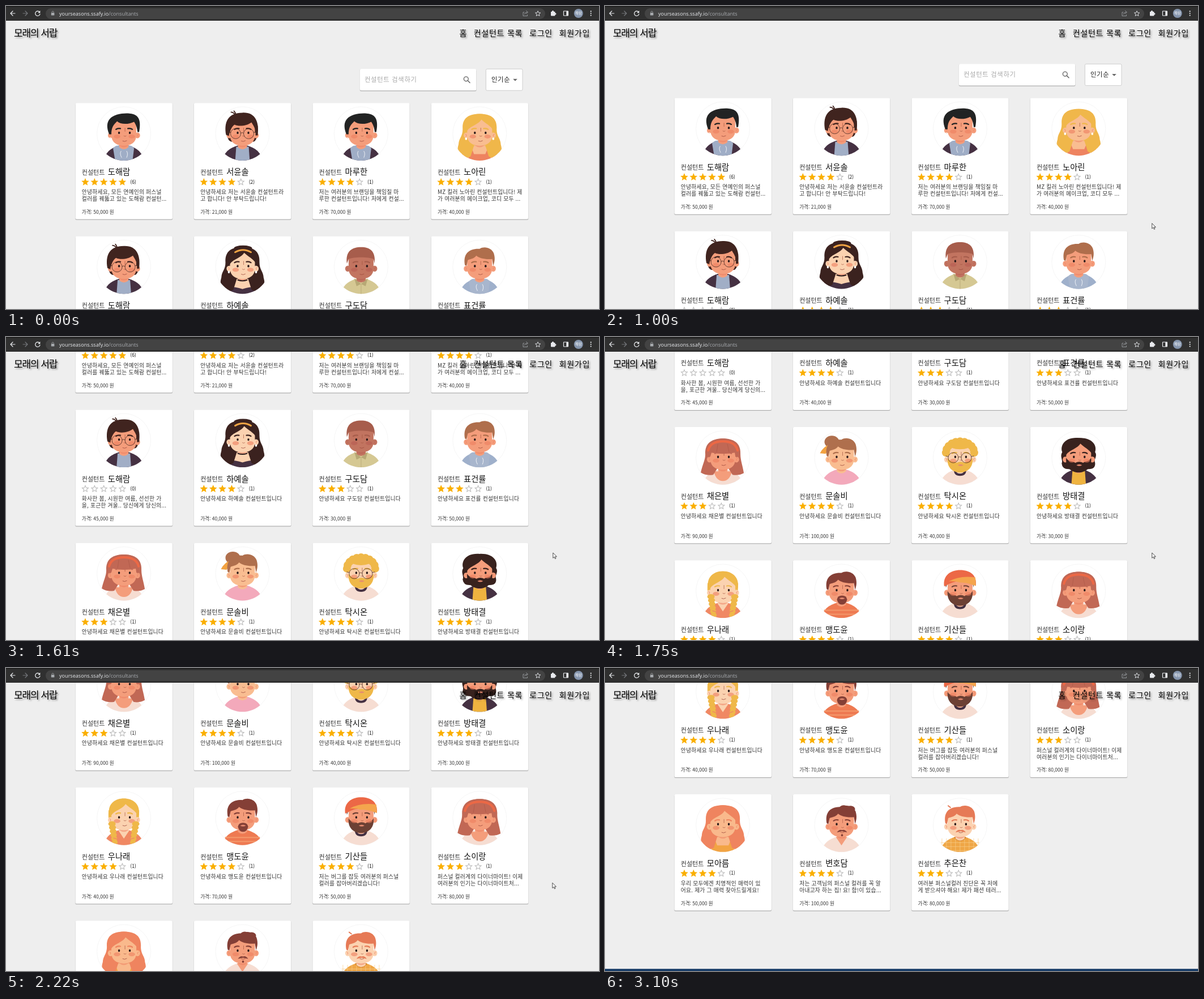
Animation of 1047x535 px, one loop 3630 ms. Source, as an HTML page:

```html
<!DOCTYPE html>
<html lang="ko">
<head>
<meta charset="utf-8">
<title>consultants</title>
<style>
html, body { margin: 0; width: 100%; height: 100%; overflow: hidden; background: #eee; }
svg { display: block; }
text { font-family: "Noto Sans CJK KR", "Noto Sans CJK", "Noto Sans KR", sans-serif; white-space: pre; }
.role { font-size: 11px; font-weight: 300; fill: #333; }
.name { font-size: 14.3px; font-weight: 300; fill: #111; }
.desc { font-size: 9.8px; font-weight: 300; letter-spacing: .21px; fill: #333; }
.price { font-size: 8.55px; font-weight: 300; fill: #333; }
.count { font-size: 8.5px; font-weight: 500; fill: #111; }
.field { font-size: 11.3px; font-weight: 300; letter-spacing: .7px; }
.nav { font-size: 14px; font-weight: 350; letter-spacing: .75px; fill: #000; filter: drop-shadow(2px 2px 1.5px rgba(0,0,0,.42)); }
.logo { font-size: 17px; font-weight: 300; letter-spacing: -1.1px; }
.url { font-family: "Open Sans", sans-serif; font-size: 9.1px; fill: #e8eaed; }
</style>
</head>
<body>
<svg id="stage" width="1047" height="535" viewBox="0 0 1047 535"></svg>
<script>
const LOOP = 3630, TICK = 67.2;
const ROW = 235.3, COL = 209.4;
const INK = '#2a1a1a', PLUM = '#453142', PALE = '#f6ddd2';
const PEACH = '#f49d7b', SAND = '#f9bd91', CREAM = '#fbd2b0';

const fill = (d, c, x = '') => `<path d="${d}" fill="${c}" ${x}/>`;
const line = (d, c, w = .8) => `<path d="${d}" fill="none" stroke="${c}" stroke-width="${w}" stroke-linecap="round" stroke-linejoin="round"/>`;
const oval = (x, y, rx, ry, c, o = 1) => `<ellipse cx="${x}" cy="${y}" rx="${rx}" ry="${ry}" fill="${c}" opacity="${o}"/>`;
const ring = (x, y, r, c, w = .8) => `<circle cx="${x}" cy="${y}" r="${r}" fill="none" stroke="${c}" stroke-width="${w}"/>`;
const rect = (x, y, w, h, c, r = 0, more = '') => `<rect x="${x}" y="${y}" width="${w}" height="${h}" rx="${r}" fill="${c}" ${more}/>`;
const text = (x, y, cls, s, more = '') => `<text x="${x}" y="${y}" class="${cls}" ${more}>${s}</text>`;
const at = (x, y, s, k = 1) => `<g transform="translate(${x} ${y}) scale(${k})">${s}</g>`;
const seq = (n, f) => Array.from({ length: n }, (_, i) => f(i)).join('');

const BACK = {
  long: 'M0-35C-24-35-31-24-30-8C-30 4-36 8-37 16C-37 21-40 24-38 31C-36 41-26 46-16 40L-10 21H10L16 40C26 46 36 41 38 31C40 24 37 21 37 16C36 8 30 4 30-8C31-24 24-35 0-35Z',
  bob: 'M0-34C-24-34-32-22-31-6C-31 4-36 12-39 26Q-30 32-17 30L-10 19H10L17 30Q28 32 37 27C35 14 31 4 31-6C32-22 24-34 0-34Z',
  shag: 'M0-35C-26-37-33-20-29-10C-34-2-27 4-30 10Q-29 20-18 20H18Q30 20 29 9C26 3 34-3 29-10C33-22 24-36 0-35Z',
  crop: 'M-27-14C-28 6-26 12-20 14H20C25 12 27 4 27-14Z'
};
const FRONT = {
  sweep: 'M-26 1C-31-12-30-20-25-26C-16-37 12-38 20-33C30-28 29-14 27-3L24-3C23-13 21-16 18-21C8-16-6-16-12-22C-16-17-22-14-22 1Z',
  mop: 'M-29 2C-33-20-26-37 0-37C22-38 30-22 27 3L23 3C24-10 19-14 16-20C8-14-6-12-14-16C-20-12-23-2-24 4Z',
  buzz: 'M-25-6C-28-28-16-35 0-35C16-35 26-28 24-6L22-14C14-18-14-18-22-14Z',
  quiff: 'M-26-3C-30-24-18-33 0-32C8-37 21-34 25-24C28-14 26-8 24-2L22-14C10-13 0-15-6-20C-10-14-18-14-21-12L-23-2Z',
  part: 'M-24-1C-32-22-18-35 0-35C18-35 32-22 25-1C24-12 14-15 3-25C-4-14-20-14-24-1Z',
  fringe: 'M-25 0C-31-24-18-34 0-34C18-34 31-24 25 0L22-3L21-9Q0-5-20-9L-22-3Z'
};
const BEARD = {
  full: 'M-22 0C-18 8-11 5-6 9Q1 5 8 9C12 5 18 8 22 0C24 19 11 26 0 26S-24 19-22 0Z',
  goat: 'M-8 15Q-7 8 1 8Q9 8 10 15Q8 24 1 24Q-6 24-8 15Z',
  tache: 'M-8 13Q-4 7 1 9Q6 7 10 13Q5 12 1 11Q-3 12-8 13Z'
};
const BODY = 'M-36 50C-33 31-21 25-9 21H9C21 25 33 31 36 50Z';

// Details of clothing drawn over the body shape
const TOP = {
  hood: c => fill('M-19 26Q-12 16 0 26Q12 16 18 26L15 50H-15Z', c) + line('M-5 31Q-8 35-4 42M5 31Q8 35 5 42', '#fff'),
  open: c => fill('M-11 23H11L13 50H-13Z', c),
  ringed: c => fill('M-11 21Q-11 32 0 32T11 21L7 21Q7 28 0 28T-7 21Z', c),
  vee: (c, skin) => fill('M-10 21L0 36L10 21Z', skin),
  scoop: (c, skin) => fill('M-16 24Q-12 41 0 41T16 24Z', skin),
  bare: (c, skin) => fill('M-36 36C-25 28-14 26-9 20H9C14 26 25 28 36 36Q18 33 0 39Q-18 33-36 36Z', skin),
  tank: (c, skin) => fill('M-36 50C-32 30-20 27-8 21H8C20 27 32 30 36 50H22L14 26L10 36H-10L-14 26L-22 50Z', skin),
  stripe: c => line('M-30 34H30M-33 41H33', c, 2),
  check: c => line(seq(9, i => `M${i * 8 - 32} 24V50`) + 'M-34 31H34M-34 38H34M-34 45H34', c, .7) + line('M-9 22Q0 32 9 22', '#d88a35', 3),
  collar: c => fill('M-12 20L0 30L-8 34ZM12 20L0 30L8 34Z', c) + line('M0 30V48', c),
  plain: () => ''
};

const bun = c => oval(-17, -28, 13, 11, c) + fill('M-38-8Q-32-20-20-24L-8-22Q-24-15-28-7Z', '#f2a241');
const glasses = ring(-12, 0, 9, '#4a2a22') + ring(11, 0, 9, '#4a2a22') + line('M-3-1Q0-3 2-1M-21-2L-25-3M20-2L24-3', '#4a2a22');
const curls = c => seq(11, i => {
  const a = Math.PI * (1 + i / 10);
  return oval((25 * Math.cos(a)).toFixed(1), (-9 + 20 * Math.sin(a)).toFixed(1), 7, 7, c);
}) + oval(0, -23, 20, 8, c);
const braids = c => seq(12, i => {
  const k = i >> 1, s = i % 2 ? 1 : -1;
  return oval(s * (21 - k), 10 + k * 6.5, 6.5 - k * .3, 4.6, c);
}) + line('M-18 35L-11 37M11 37L18 35', '#ef8b62', 1.5);
const beads = oval(-24, 9, 1.8, 2.2, '#fff') + oval(24, 9, 1.8, 2.2, '#fff');
const band = (c, y) => line(`M-26 ${y + 16}Q-22 ${y} 0 ${y}T26 ${y + 16}`, c, 4);

const LOOKS = {
  black: { skin: PEACH, hair: '#222323', front: 'sweep', cloth: PLUM, top: ['hood', '#9fadc6'], extra: ring(-24, 9, 2, '#fff') },
  specs: { skin: PEACH, hair: '#40241f', back: 'crop', front: 'mop', cloth: PLUM, top: ['open', '#a1aec6'], extra: line('M-14-35Q-17-38-20-38M-12-35Q-13-38-15-40', '#40241f', 1.8) + glasses },
  blonde: { skin: SAND, hair: '#f0b74a', back: 'long', front: 'part', cloth: '#ee8360', top: ['tank'], extra: beads },
  bunned: { skin: CREAM, hair: '#3b221f', back: 'long', front: 'part', cloth: PLUM, top: ['bare'], extra: oval(1, -33, 16, 5, '#3b221f') + line('M-13-26Q1-34 15-26', '#f0a343', 3) + line('M-8 23Q0 26 8 23', INK, 2) + beads },
  russet: { skin: '#c27460', hair: '#a75d4c', front: 'buzz', cloth: '#d5c893', top: ['collar', '#b7a875'], cheek: '#b85c52' },
  brown: { skin: PEACH, hair: '#af6e4c', front: 'quiff', cloth: '#9fb0cb', top: ['hood', '#a8b6cd'] },
  bob: { skin: PEACH, hair: '#c16855', back: 'bob', front: 'fringe', cloth: PALE, top: ['scoop'], extra: band('#ec6845', -29) + line('M-9-24L-11-10M8-24L11-10', '#a85646', .6) },
  bunny: { skin: SAND, hair: '#af6f4d', front: 'quiff', cloth: '#f3a9bb', top: ['plain'], behind: bun },
  curly: { skin: CREAM, hair: '#efb849', front: curls, cloth: PALE, top: ['ringed', PLUM], beard: 'full', extra: glasses },
  shag: { skin: PEACH, hair: '#38221e', back: 'shag', front: 'part', cloth: PLUM, top: ['open', '#efb340'], beard: 'full' },
  braid: { skin: CREAM, hair: '#efb849', back: 'crop', front: 'part', cloth: '#f08863', top: ['vee'], extra: braids('#efb849') },
  goat: { skin: PEACH, hair: '#843f36', front: 'quiff', cloth: '#ee7a52', top: ['stripe', '#f4986b'], beard: 'goat' },
  beanie: { skin: PEACH, hair: '#6c4034', front: 'buzz', cloth: PALE, top: ['ringed', PLUM], beard: 'full', extra: fill('M-28-8C-31-28-16-37 0-37C18-37 30-28 28-10Q0-26-28-8Z', '#ec6846') + fill('M-20-17Q0-28 27-24L28-9Q10-16 0-15Q-10-18-20-17Z', '#f4a54d') },
  coral: { skin: '#f9b98c', hair: '#ef845f', back: 'long', front: 'part', cloth: '#f2a444', top: ['tank'] },
  wavy: { skin: PEACH, hair: '#843f36', front: c => fill(FRONT.quiff, c) + oval(4, -29, 8, 6, c) + oval(16, -28, 8, 6, c), cloth: PALE, top: ['vee'], beard: 'tache', extra: oval(1, 18, 1.8, 2, '#843f36') },
  ginger: { skin: CREAM, hair: '#e67a56', front: 'quiff', cloth: '#efa645', top: ['check', '#f8cf8d'], beard: 'tache', extra: line('M-17-31L-21-34', '#e67a56', 2) }
};

function avatar(key) {
  const o = LOOKS[key], { skin, hair } = o, cheek = o.cheek || '#ee7f60';
  const [kind, tint] = o.top;
  const front = typeof o.front === 'function' ? o.front(hair) : fill(FRONT[o.front], hair);
  const beard = o.beard ? fill(BEARD[o.beard], hair) : '';
  const mouth = o.beard === 'full' || o.beard === 'goat'
    ? fill('M-4 13Q1 10 6 13Q1 16-4 13Z', '#e58a70') : line('M-2 13Q1 15 5 12.5', '#9c4a3c');
  return ring(0, 0, 47.5, '#f1f1f1', .7) + `<g clip-path="url(#disc)">`
    + fill(BODY, o.cloth) + TOP[kind](tint, skin)
    + (o.back ? fill(BACK[o.back], hair) : '') + (o.behind ? o.behind(hair) : '')
    + fill('M-8 12H8V24Q0 31-8 24Z', skin)
    + fill('M-8 17Q0 25 8 17V21Q0 27-8 21Z', cheek, 'opacity=".5"')
    + oval(-23.5, 3, 4.6, 5.2, skin) + oval(24, 3, 4.6, 5.2, skin)
    + line('M-25 1Q-22 2-24 5M26 1Q22 2 25 5', cheek)
    + fill('M-22-20V2C-22 16-12 21 0 21S22 16 22 2V-20Q0-33-22-20Z', skin)
    + beard + oval(-12, 5, 5.8, 3.5, cheek, .6) + oval(14, 5, 5.8, 3.5, cheek, .6)
    + line('M-14-7.5Q-11-10-6-9M7-9Q12-10 15-7.5', hair, 2.2)
    + oval(-8.5, -1.5, 1.7, 2.2, INK) + oval(10.5, -1.5, 1.7, 2.2, INK)
    + line('M2-10V-4M0 4Q2 6 4 4', '#a4553f', .7) + mouth + front + (o.extra || '') + '</g>';
}

const hello = n => [`안녕하세요 ${n} 컨설턴트입니다`];
const person = (look, name, stars, price, lines = hello(name), count = 1) => ({ look, name, stars, price, lines, count });
const people = [
  person('black', '도해람', 5, '50', ['안녕하세요, 모든 연예인의 퍼스널', '컬러를 꿰뚫고 있는 도해람 컨설턴...'], 6),
  person('specs', '서윤솔', 4, '21', ['안녕하세요 저는 서윤솔 컨설턴트라', '고 합니다! 안 부탁드립니다!'], 2),
  person('black', '마루한', 4, '70', ['저는 여러분의 브랜딩을 책임질 마', '루한 컨설턴트입니다! 저에게 컨설...']),
  person('blonde', '노아린', 4, '40', ['MZ 킬러 노아린 컨설턴트입니다! 제', '가 여러분의 메이크업, 코디 모두 ...']),
  person('specs', '도해람', 0, '45', ['화사한 봄, 시원한 여름, 선선한 가', '을, 포근한 겨울.. 당신에게 당신의...'], 0),
  person('bunned', '하예솔', 4, '40'),
  person('russet', '구도담', 3, '30'),
  person('brown', '표건률', 3, '50'),
  person('bob', '채은별', 3, '90'),
  person('bunny', '문솔비', 4, '100'),
  person('curly', '탁시온', 4, '40'),
  person('shag', '방태결', 4, '30'),
  person('braid', '우나래', 4, '40'),
  person('goat', '맹도윤', 4, '70'),
  person('beanie', '기산들', 4, '50', ['저는 버그를 잡듯 여러분의 퍼스널', '컬러를 잡아버리겠습니다!']),
  person('bob', '소이랑', 3, '80', ['퍼스널 컬러계의 다이너마이트! 이제', '여러분의 인기는 다이너마이트처...']),
  person('coral', '모아름', 4, '50', ['우리 모두에겐 치명적인 매력이 있', '어요. 제가 그 매력 찾아드릴게요!']),
  person('wavy', '변호담', 4, '100', ['저는 고객님의 퍼스널 컬러를 꼭 알', '아내고자 하는 집! 요! 함!이 있습...']),
  person('ginger', '추은찬', 3, '80', ['여러분 퍼스널컬러 진단은 꼭 저에', '게 받으셔야 해요! 제가 패션 테러...'])
];

const paper = (x, y, w, h) => rect(x - .6, y, w + 1.2, h + 1.6, '#000', 2.6, 'opacity=".07"')
  + rect(x, y + 1, w, h, '#000', 2.2, 'opacity=".23"') + rect(x, y, w, h, '#fff', 2.2);
const STAR = 'M12 17.27L18.18 21L16.54 13.97L22 9.24L14.81 8.63L12 2L9.19 8.63L2 9.24L7.46 13.97L5.82 21Z';
const HOLE = 'M12 15.4L8.24 17.67L9.24 13.39L5.92 10.51L10.3 10.13L12 6.1L13.71 10.14L18.09 10.52L14.77 13.4L15.77 17.68Z';

function card(p, i) {
  const stars = seq(5, k => at(9.3 + 16.35 * k, 131.3, k < p.stars
    ? fill(STAR, '#faaf00') : fill(STAR + HOLE, '#bcbcbc', 'fill-rule="evenodd"'), .681));
  return at(122.5 + COL * (i % 4), 171.2 + ROW * (i >> 2),
    paper(0, 0, 171.4, 205.2) + at(85.6, 54.2, avatar(p.look))
    + text(11.3, 126.6, 'role', '컨설턴트') + text(57.3, 127.2, 'name', p.name) + stars
    + text(96.8, 142.4, 'count', `(${p.count})`)
    + p.lines.map((s, k) => text(11.3, 160.8 + 12 * k, 'desc', s)).join('')
    + text(11.3, 195.7, 'price', `가격: ${p.price},000 원`));
}

const tools = paper(625, 111, 205.3, 38.3) + text(633, 134.2, 'field', '컨설턴트 검색하기', 'fill="#a8a8a8"')
  + ring(812.3, 128.8, 3.9, '#666', 1.4) + line('M815.3 131.8L819 135.5', '#666', 1.6)
  + rect(847.4, 111.2, 64.6, 38, '#fff', 2.2, 'stroke="#c4c4c4" stroke-width=".8"')
  + text(857, 134.2, 'field', '인기순', 'fill="#222"') + fill('M895.2 128.7H902.8L899 132.5Z', '#666');

const nav = text(14, 54, 'nav logo', '모래의 서랍') + text(800.5, 53, 'nav', '홈') + text(825.7, 53, 'nav', '컨설턴트 목록')
  + text(924, 53, 'nav', '로그인') + text(976.5, 53, 'nav', '회원가입');

const W = '#e8eaed', G = '#a8abaf';
const browser = rect(0, 0, 1047, 26, '#303030') + rect(0, 0, 1047, 1.5, '#1b1b1b') + rect(70, 4, 882, 19, '#434343', 9.5)
  + line('M16 13H8M12 9L8 13L12 17', W, 1.2) + line('M30 13H38M34 9L38 13L34 17', '#75777b', 1.2)
  + line('M59.2 10.6A4.2 4.2 0 1 0 60 14.2', W, 1.3) + fill('M60.4 8V12.2H56.2Z', W)
  + rect(79.8, 12, 5.6, 4.6, G, .7) + line('M81 12V10.8A1.6 1.6 0 0 1 84.2 10.8V12', G)
  + text(94, 16.6, 'url', `yourseasons.ssafy.io<tspan fill="${G}">/consultants</tspan>`)
  + line('M915 11H913V17.5H920.5V15.5M915.5 14.5Q916 11 920 11M918.5 8.5L921.5 11L918.5 13.5', G)
  + at(933.6, 7.8, `<path d="${STAR}" fill="none" stroke="${W}" stroke-width="2"/>`, .46)
  + rect(962, 10, 7.5, 7.5, W, 1) + oval(965.5, 9.6, 1.6, 1.6, W) + oval(969.9, 13.8, 1.6, 1.6, W)
  + rect(984.5, 9, 8, 8, 'none', .5, `stroke="${W}" stroke-width="1.2"`) + rect(989.3, 9, 3.2, 8, W)
  + oval(1010.8, 13, 8, 8, '#8595ad') + text(1010.8, 15.3, '', '해람', 'font-size="6.4" fill="#fff" text-anchor="middle"')
  + seq(3, i => oval(1032.7, 9.4 + 3.6 * i, 1.1, 1.1, W));

const stage = document.getElementById('stage');
stage.innerHTML = '<defs><clipPath id="disc"><circle r="47.5"/></clipPath></defs>'
  + rect(0, 0, 1047, 535, '#eee')
  + `<g id="page">${tools}${people.map(card).join('')}${rect(0, 1420.5, 1047, 60, '#173c68')}</g>`
  + nav + browser
  + `<path id="mouse" d="M0 0V9.3L2.2 7.3L3.7 10.6L5.2 9.9L3.7 6.8H6.6Z" fill="#fff" stroke="#222" stroke-width=".8"/>`;
const page = document.getElementById('page'), mouse = document.getElementById('mouse');

// Wheel strokes: first tick, length in ticks, steepness, distance
const strokes = [[15, 6, 2.5, 272.6], [24, 5, 3.5, 272.6], [32, 4.14, 3.5, 272.8], [40, 5, 1.75, 71.3]];
const clamp = v => Math.max(0, Math.min(1, v));
const ease = (p, k) => p < .5 ? .5 * (2 * p) ** k : 1 - .5 * (2 - 2 * p) ** k;
const scrollAt = n => strokes.reduce((y, [from, len, k, dist]) => y + dist * ease(clamp((n - from + 1) / len), k), 0);

function pointerAt(n) {
  if (n < 3 || n > 45) return null;
  if (n <= 10) {
    const q = (1 - (n - 3) / 7) ** 1.6;
    return [966.3 + 50 * q, 387.3 + 142 * q];
  }
  if (n > 40) {
    const q = ((n - 40) / 6) ** 1.6;
    return [964.8 + 55 * q, 379.3 + 160 * q];
  }
  if (n < 24) return [965.8, n < 12 ? 385.3 : 383.7];
  return n < 28 ? [965.8, 381] : [964.8, 379.3];
}

function draw() {
  const t = performance.now() % LOOP;
  const n = Math.floor((t + 8) / TICK);
  page.setAttribute('transform', `translate(0 ${-scrollAt(n).toFixed(2)})`);
  const m = pointerAt(n);
  mouse.setAttribute('visibility', m ? 'visible' : 'hidden');
  if (m) mouse.setAttribute('transform', `translate(${m[0].toFixed(1)} ${m[1].toFixed(1)})`);
  requestAnimationFrame(draw);
}
draw();
</script>
</body>
</html>
```
